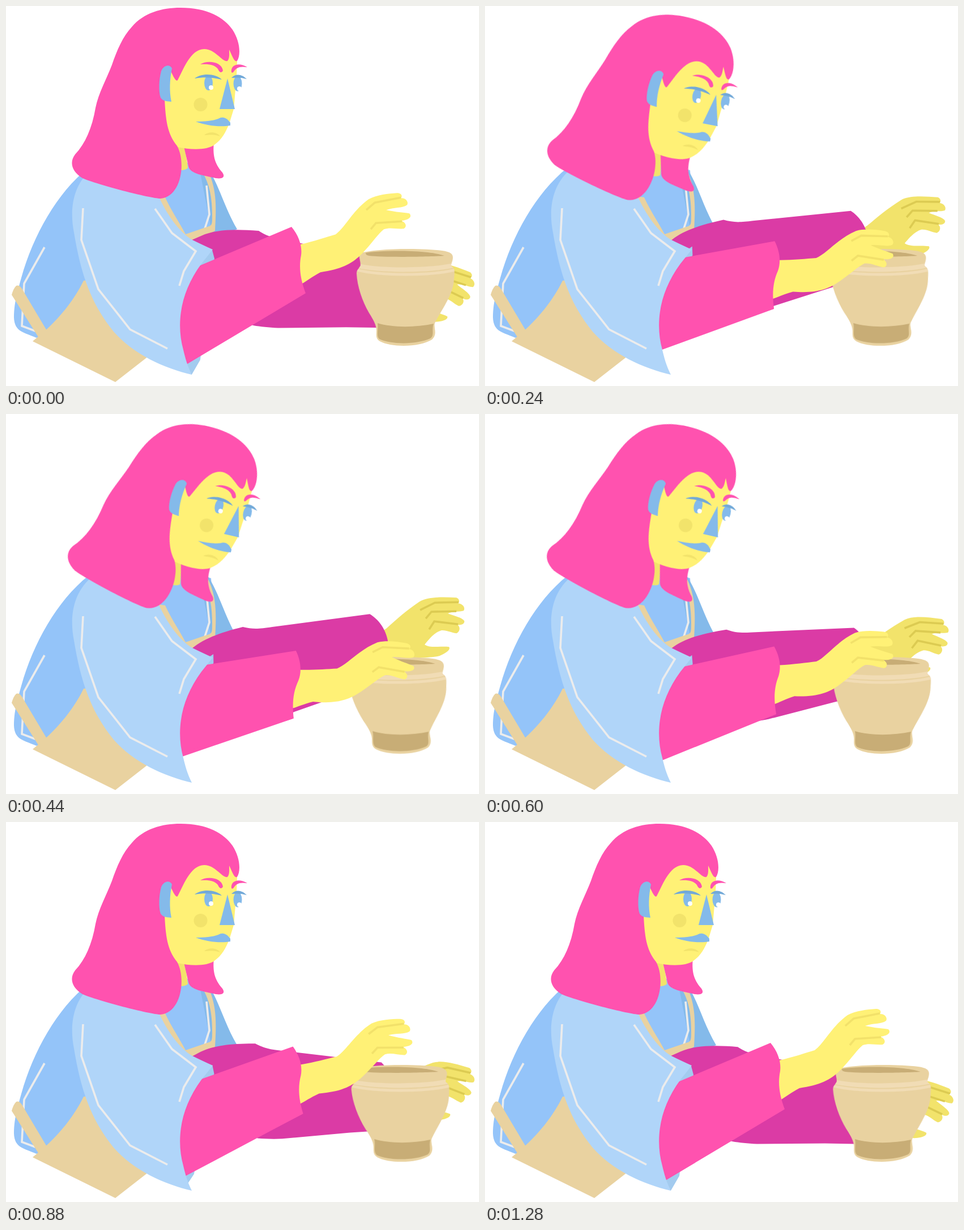
Animation of 835 by 671 pixels, one loop 1320 ms. Source, as an HTML page:

```html
<!DOCTYPE html>
<html lang="en">
<head>
<meta charset="utf-8">
<title>Potter</title>
<style>
  @property --arm { syntax: "<number>"; inherits: true; initial-value: 0; }

  html, body { margin: 0; width: 100%; height: 100%; overflow: hidden; background: #fff; }

  svg {
    display: block; width: 100vw; height: 100vh;
    animation: arms 1320ms infinite;
  }

  .hair { fill: #ff52af; }
  .skin { fill: #fff176; }
  .skin-dark { fill: #f2e36b; }
  .cuff-far { fill: #db3ba5; }
  .blue { fill: #84baea; }
  .lid { fill: #72a9d8; }
  .shirt { fill: #94c4f9; }
  .sleeve { fill: #b0d5f9; }
  .lining { fill: #a3cbef; }
  .clay { fill: #e9d2a0; }
  .clay-dark { fill: #c8ad76; }
  .line { fill: none; stroke-width: 3.6; }
  .stitch { stroke: #ececec; }
  .crease { stroke: #f2e16a; }
  .crease-far { stroke: #dccb52; }
  .ridge { stroke: #f1dcb5; }

  .head { transform-origin: 249px 232px; animation: nod 1320ms infinite; }
  .pot { transform-origin: 0 700px; animation: wobble 1320ms linear infinite; }
  .near { transform-origin: 394px 436px; transform: rotate(calc(var(--arm) * 14deg)); }
  .far { transform-origin: 369px 471px; transform: rotate(calc((1 - var(--arm)) * 19deg)); }
  .hem { transform-origin: 529px 507px; transform: rotate(calc(var(--arm) * -2deg)); }

  @keyframes arms {
    0% { --arm: 0; animation-timing-function: cubic-bezier(.333, .333, .667, .72); }
    24.24% { --arm: 1.165; animation-timing-function: cubic-bezier(.333, .25, .667, .72); }
    78.79%, 100% { --arm: 0; }
  }
  @keyframes nod {
    0% { transform: rotate(0deg); animation-timing-function: cubic-bezier(.333, 0, .667, 1); }
    24.24% { transform: rotate(12.9deg); animation-timing-function: linear; }
    45.45% { transform: rotate(12.9deg); animation-timing-function: cubic-bezier(.333, 0, .667, 1); }
    65.15%, 100% { transform: rotate(0deg); }
  }
  @keyframes wobble {
    0%, 24.24%, 48.48%, 72.73%, 100% { transform: skewX(0deg); }
    12.12%, 36.36%, 60.61%, 87.88% { transform: skewX(4.78deg); }
  }
</style>
</head>
<body>
<svg viewBox="0 0 835 671" preserveAspectRatio="none">
  <defs>
    <path id="bowl" d="M624 437C650 428 730 427 770 432C785 434 789 438 789 444C789 452 784 457 787 460C793 463 792 470 791 482C790 508 772 532 759 556C755 562 757 566 757 570C759 580 756 585 752 589C730 603 680 603 660 592C652 587 654 580 654 573C654 565 650 556 641 542C629 521 620 495 619 472C619 466 624 463 626 458C626 450 623 445 624 437Z"/>
    <clipPath id="bowlClip"><use href="#bowl"/></clipPath>
  </defs>

  <!-- torso and apron -->
  <path class="shirt" d="M145 286C90 330 48 405 27 480C20 505 14 525 14 550C15 576 32 576 54 586L68 580L110 590L160 500L335 425L370 395L362 290L300 270Z"/>
  <path class="blue" d="M340 280L356 286C376 315 385 355 408 394L366 412Z"/>
  <path class="line stitch" d="M68 426L32 490L28 565L52 574M354 317L359 368L351 393"/>
  <path class="clay" d="M268 336L281 338C292 362 305 380 317 403L355 390C364 388 364 385 364 370C364 340 360 315 346 292L357 292C373 325 371 360 369 397L330 418L290 385Z"/>
  <path class="clay" d="M137 485C115 530 82 562 65 577L47 592L193 664L252 618L180 480Z"/>
  <path class="clay" d="M10 510Q13 499 18 494Q23 492 28 499L72 573L58 586Z"/>

  <!-- far arm -->
  <g class="far">
    <path class="skin-dark" d="M655 390L672 378C690 362 705 348 730 331C745 322 770 323 795 324C802 327 800 333 798 334C807 335 811 342 808 347C800 350 790 347 780 352C793 357 805 359 809 365C810 371 803 373 797 372C803 376 801 385 795 387C785 386 778 381 768 382C755 386 745 400 739 407C750 414 768 409 782 411C786 416 775 423 765 427C745 431 720 430 680 432L655 440Z"/>
    <path class="line crease-far" d="M731 346L757 333L799 332M741 361L751 349L795 348M747 380L756 366L798 371"/>
    <path class="cuff-far" d="M300 440L325 417C345 398 378 386 418 376C435 380 445 380 470 376L642 353C656 361 670 378 674 400C670 425 668 450 671 470L619 487L506 527C490 532 475 535 464 537L380 540Z"/>
  </g>

  <!-- pot -->
  <g class="pot">
    <use class="clay" href="#bowl"/>
    <path class="clay-dark" d="M635 436C660 431 745 430 774 441C745 443 665 444 641 441Q635 440 635 436Z"/>
    <path class="clay-dark" d="M656 560C682 568 722 568 755 561C751 572 757 582 749 587C725 598 680 598 659 588C653 582 658 572 656 560Z"/>
    <g class="line ridge" clip-path="url(#bowlClip)">
      <path stroke-width="8" d="M618 458C660 468 750 468 795 457"/>
      <path stroke-width="5" d="M615 465C660 477 750 477 797 465"/>
    </g>
  </g>

  <!-- near arm -->
  <g class="near">
    <path class="lining" d="M364 431L368 446L343 625L328 651L312 640L300 500Z"/>
    <path class="skin" d="M510 424L519 421C545 415 565 408 582 403C598 392 612 361 640 341C655 333 675 331 690 330C699 330 700 336 697 339C706 338 711 346 708 351C700 357 685 355 671 360C690 364 700 364 712 366C717 371 713 377 698 379C708 383 707 391 702 393C690 394 678 390 667 394C657 402 648 416 634 431C616 452 597 464 555 470C540 478 530 486 523 490L510 494Z"/>
    <path class="line crease" d="M636 360L651 347L697 338M644 394L653 383L699 380"/>
    <path class="hair hem" d="M529 507L320 632L300 640L330 560Z"/>
    <path class="hair" d="M343 458L504 390C518 407 523 425 521 440C517 460 519 480 529 507L320 632L300 640L280 485Z"/>
  </g>
  <path class="sleeve" d="M148 291C118 318 112 360 120 400C130 460 145 520 190 575C225 615 280 640 328 651C320 635 316 620 313 607C300 560 308 505 345 455L365 430Q345 421 329 413C305 399 283 366 270 337L200 285Z"/>
  <path class="line stitch" d="M136 357L133 413L163 500L219 571L285 605M263 358L293 401L335 433L314 468L306 494"/>

  <!-- head -->
  <g class="head">
    <path class="skin-dark" d="M295 240L315 249C318 265 320 275 321 286Q317 290 308 290Z"/>
    <path class="hair" d="M314 248L322 283C325 297 350 299 370 304C384 306 387 301 382 294C367 277 365 262 367 240Z"/>
    <path class="skin" d="M260 110L345 65L395 70L408 97L407 125L402 182L394 208C388 222 382 235 368 245C355 255 325 254 303 249L285 249L255 165Z"/>
    <path class="hair" d="M308 3C355 3 385 20 400 42C413 62 415 86 408 97C403 100 400 89 394 77C394 85 395 92 391 97C382 100 370 76 350 76C325 76 312 115 303 131C300 134 296 126 291 115L280 165C282 200 284 225 302 247C318 275 310 337 273 340C255 340 160 315 135 304C115 292 112 275 122 262C140 243 152 215 158 180C163 154 178 128 187 104C196 78 206 54 222 37C243 12 275 3 308 3Z"/>
    <path class="blue" d="M293 110C289 102 278 104 274 115C270 130 269 150 273 162C278 169 285 168 292 169C288 150 289 130 293 110Z"/>
    <circle class="skin-dark" cx="343.5" cy="174" r="12"/>
    <path class="skin-dark" d="M350 228C358 221 372 222 378 230C366 226 358 228 350 228Z"/>
    <ellipse class="blue" cx="357.5" cy="136" rx="7.5" ry="13"/>
    <ellipse class="blue" cx="409" cy="137" rx="7.5" ry="13.5"/>
    <circle cx="362" cy="144" r="4" fill="#fff"/>
    <circle cx="412" cy="146" r="4" fill="#fff"/>
    <path class="lid" d="M333 128C345 118 370 119 381 130C365 126 350 125 333 128ZM398 127C406 118 417 121 425 129C415 126 407 126 398 127Z"/>
    <path class="hair" d="M343 103C355 95 381 98 383 114C380 120 376 116 374 111C367 103 357 102 343 103ZM398 117C396 103 412 99 426 108C412 106 406 109 402 116Q400 119 398 117Z"/>
    <path class="blue" d="M391 128L377 182L404 182Z"/>
    <path class="blue" d="M335 204C350 204 365 203 375 199C383 194 390 198 396 206L396 211C380 214 355 212 335 204Z"/>
  </g>
</svg>
</body>
</html>
```
